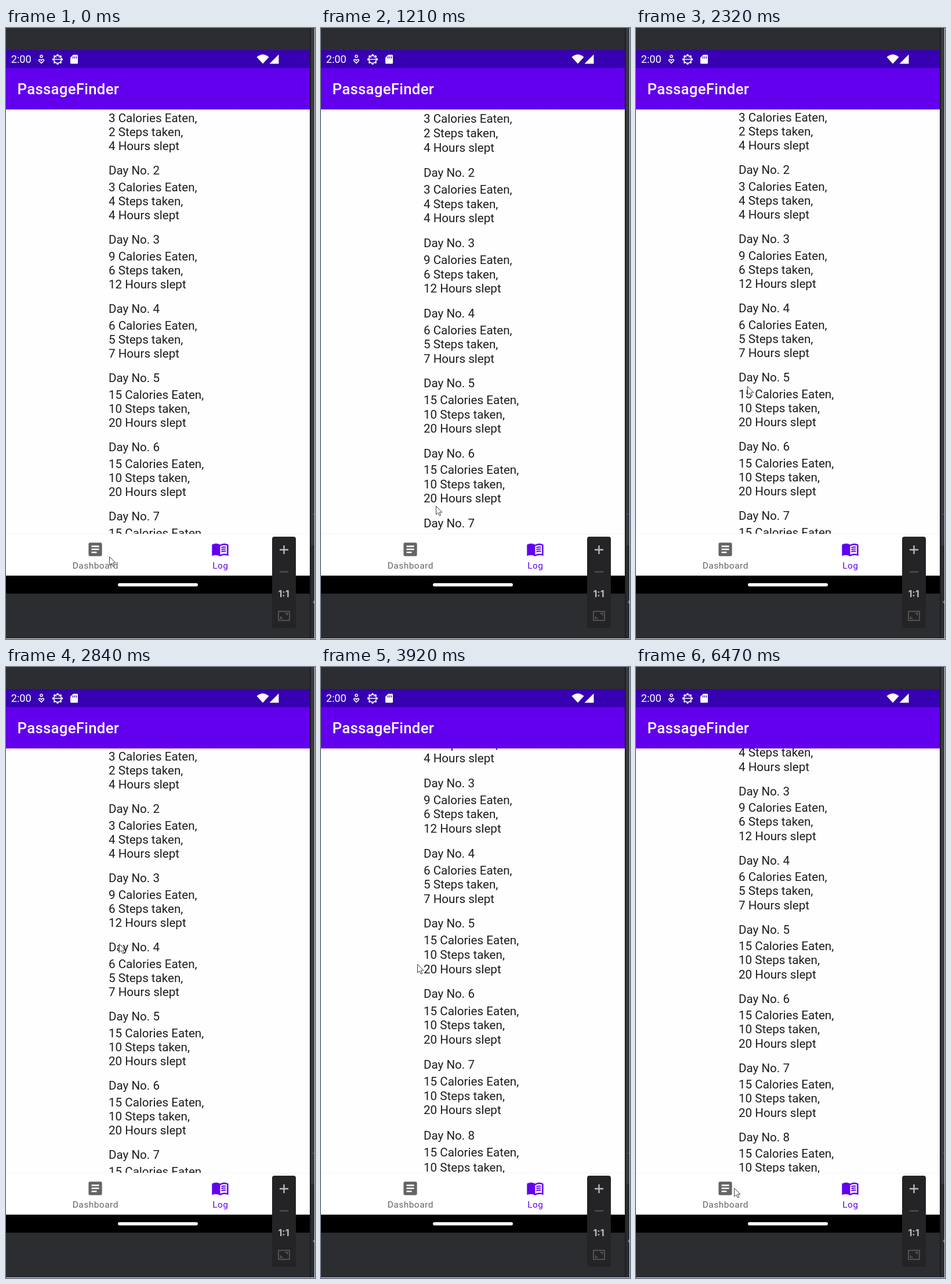
An HTML page for the animation above (8000 ms loop, 533x1051 px).

```html
<!DOCTYPE html>
<html lang="en">
<head>
<meta charset="utf-8">
<title>Daily log</title>
<style>
  html, body { margin: 0; width: 100%; height: 100%; overflow: hidden; background: #2b2d30; }
  svg { display: block; width: 100vw; height: 100vh; font-family: Roboto, sans-serif; }
  #list { font-size: 20.6px; fill: #1c1c1c; }
  .tab { font-size: 15.45px; letter-spacing: .5px; text-anchor: middle; }
</style>
</head>
<body>
<svg viewBox="0 0 533 1051">
  <defs>
    <clipPath id="view"><rect y="140" width="524" height="731"/></clipPath>
    <linearGradient id="shade" x2="0" y2="1">
      <stop stop-color="#e6e3ee"/><stop offset="1" stop-color="#fefefe"/>
    </linearGradient>
  </defs>

  <!-- window -->
  <rect width="533" height="1051" fill="#2b2d30"/>
  <rect x="526" width="7" height="890" fill="#393b40"/>
  <rect x="524" width="2" height="1051" fill="#1e1f22"/>
  <path d="M529 836.5h4" stroke="#4b7f96"/>
  <path d="M533 985q-6 2.500 0 5" fill="none" stroke="#a9cfda"/>
  <path d="M0 1050.500h532.500V0" fill="none" stroke="#e4e4e4"/>

  <!-- list -->
  <rect y="140" width="524" height="802" fill="#fefefe"/>
  <rect y="140" width="524" height="4" fill="url(#shade)"/>
  <g id="list" clip-path="url(#view)"></g>

  <!-- status and title bars -->
  <rect y="38" width="524" height="31" fill="#3700b3"/>
  <rect y="69" width="524" height="71" fill="#6200ee"/>
  <g fill="#fff">
    <text x="8.700" y="60.400" font-size="18.200">2:00</text>
    <text x="19.500" y="114.300" font-size="25.750" font-weight="500" letter-spacing=".3">PassageFinder</text>
    <path d="M111 51l5-5h6.500q1.500 0 1.500 1.500v12.500q0 1.500-1.500 1.500h-10q-1.500 0-1.500-1.500z"/>
    <path d="M115.500 49v3.500M118.500 49v3.500M121.500 49v3.500" stroke="#3700b3" stroke-width="1.300"/>
    <path d="M443 61.500L432.500 50Q443 41 453.500 50zM470.500 45.500v16h-16z"/>
  </g>
  <g fill="none" stroke="#fff" stroke-width="1.600">
    <circle cx="61" cy="48.800" r="2"/>
    <path d="M61 60.500l-4-4q-1-2.500 1.200-2.500q1.800 0 2.800 2q1-2 2.800-2q2.200 0 1.200 2.500z"/>
    <circle cx="89" cy="54" r="6.500"/>
    <circle cx="89" cy="54" r="8" stroke-width="2" pathLength="16" stroke-dasharray="1" stroke-dashoffset=".5"/>
    <path d="M83 54h12M86.500 51v-1M91.500 51v-1"/>
  </g>

  <!-- bottom navigation -->
  <rect y="870" width="524" height="1" fill="#f6f6f6"/>
  <rect y="871" width="524" height="71" fill="#fff"/>
  <g fill="#646464">
    <rect x="142.400" y="885.200" width="23.200" height="23.200" rx="2.600"/>
    <path d="M147.500 891.600h13M147.500 896.800h13M147.500 902h9" stroke="#fff" stroke-width="2.600"/>
    <text class="tab" x="154.300" y="929.500">Dashboard</text>
  </g>
  <g fill="#6200ee">
    <g transform="translate(354 881) scale(1.2875)">
      <path d="M12 21.500q-5-2.800-11-.5V6q5.500-3 11 0q5.500-3 11 0v15q-6-2.300-11 .5z"/>
      <path d="M12 8q4-2.300 9-1v11.500q-5-1.300-9 1z" fill="#fff"/>
      <path d="M13.500 10.200q3-1.500 6.200-.8m-6.200 3.500q3-1.500 6.200-.8m-6.200 3.500q3-1.500 6.200-.8" fill="none" stroke="#6200ee" stroke-width="1.500"/>
    </g>
    <text class="tab" x="369.800" y="929.500">Log</text>
  </g>
  <rect y="942" width="524" height="31"/>
  <rect x="193" y="955" width="138" height="5.500" rx="2.700" fill="#fff"/>

  <!-- zoom panel -->
  <rect x="459" y="875" width="41" height="157" rx="4" fill="#242426"/>
  <path d="M472 897.500h15M479.500 890v15" stroke="#b9b9b9" stroke-width="2.400"/>
  <path d="M472 935.500h15" stroke="#555" stroke-width="2"/>
  <text x="479" y="978.500" font-family="Inter, sans-serif" font-size="16" font-weight="700" text-anchor="middle" fill="#bdbdbd">1:1</text>
  <path d="M470 1003.500h19v15.500h-19zM473.500 1012v3.500h4M485.500 1010.500v-3.500h-4" fill="none" stroke="#606060" stroke-width="1.500"/>

  <path id="mouse" d="M.5.5v14.500l3.500-3.200 2.300 5.200 2.300-1-2.300-5h4.700z" fill="#fff" stroke="#3c3c3c"/>
</svg>
<script>
const LOOP = 8000, TOP = 140, HEIGHT = 730, PITCH = 119, LINE = 24.15;
const list = document.getElementById('list');
const mouse = document.getElementById('mouse');

// cursor moves: start ms, end ms, x, y
const home = [178, 909];
const moves = [
  [370, 590, 195, 642],
  [900, 1210, 198, 822],
  [1210, 1810, 189, 753],
  [1810, 2840, 195, 476],
  [3090, 3440, 170, 750],
  [3440, 3920, 166, 511],
  [3920, 4280, 172, 478],
  [5150, 5400, 183, 405],
  [5400, 5930, 177, 884],
  [5930, 6470, 169, 896]
];

const ramp = (t, from, to) => Math.min(1, Math.max(0, (t - from) / (to - from)));
const ease = p => p * p * (3 - 2 * p);

// overscroll: pulled out until peak, then springs back
const pull = (t, from, peak, to) =>
  Math.sin(ramp(t, from, peak) * Math.PI / 2) * (1 - ramp(t, peak, to)) ** 1.5;

function cursorAt(t) {
  let [x, y] = home;
  for (const [from, to, toX, toY] of moves) {
    const p = ease(ramp(t, from, to));
    x += (toX - x) * p;
    y += (toY - y) * p;
  }
  return [Math.round(x), Math.round(y)];
}

const days = [[3, 2, 4], [3, 4, 4], [9, 6, 12], [6, 5, 7], ...Array(4).fill([15, 10, 20])];
const rows = [];

function addRow(text, y) {
  const node = document.createElementNS('http://www.w3.org/2000/svg', 'text');
  node.textContent = text;
  node.setAttribute('x', 177);
  list.append(node);
  rows.push({ node, y });
}

days.forEach(([eaten, steps, slept], i) => {
  const y = 133.2 + PITCH * i;
  addRow(`Day No. ${i + 1}`, y);
  [`${eaten} Calories Eaten,`, `${steps} Steps taken,`, `${slept} Hours slept`]
    .forEach((text, j) => addRow(text, y + 28.6 + LINE * j));
});

function draw(t) {
  const offset = ramp(t, 900, 960) + 149.5 * ease(ramp(t, 3480, 3720));
  const down = 14 * pull(t, 900, 1330, 2000);
  const up = 14.8 * pull(t, 3700, 3920, 4280);
  for (const { node, y } of rows) {
    const base = y - offset;
    const v = ramp(base - 7, TOP, TOP + HEIGHT);
    node.setAttribute('y', base + down * v ** 0.5 - up * (1 - v) ** 0.65);
  }
  mouse.setAttribute('transform', `translate(${cursorAt(t)})`);
}

const start = performance.now();
function tick() {
  draw((performance.now() - start) % LOOP);
  requestAnimationFrame(tick);
}
tick();
</script>
</body>
</html>
```
